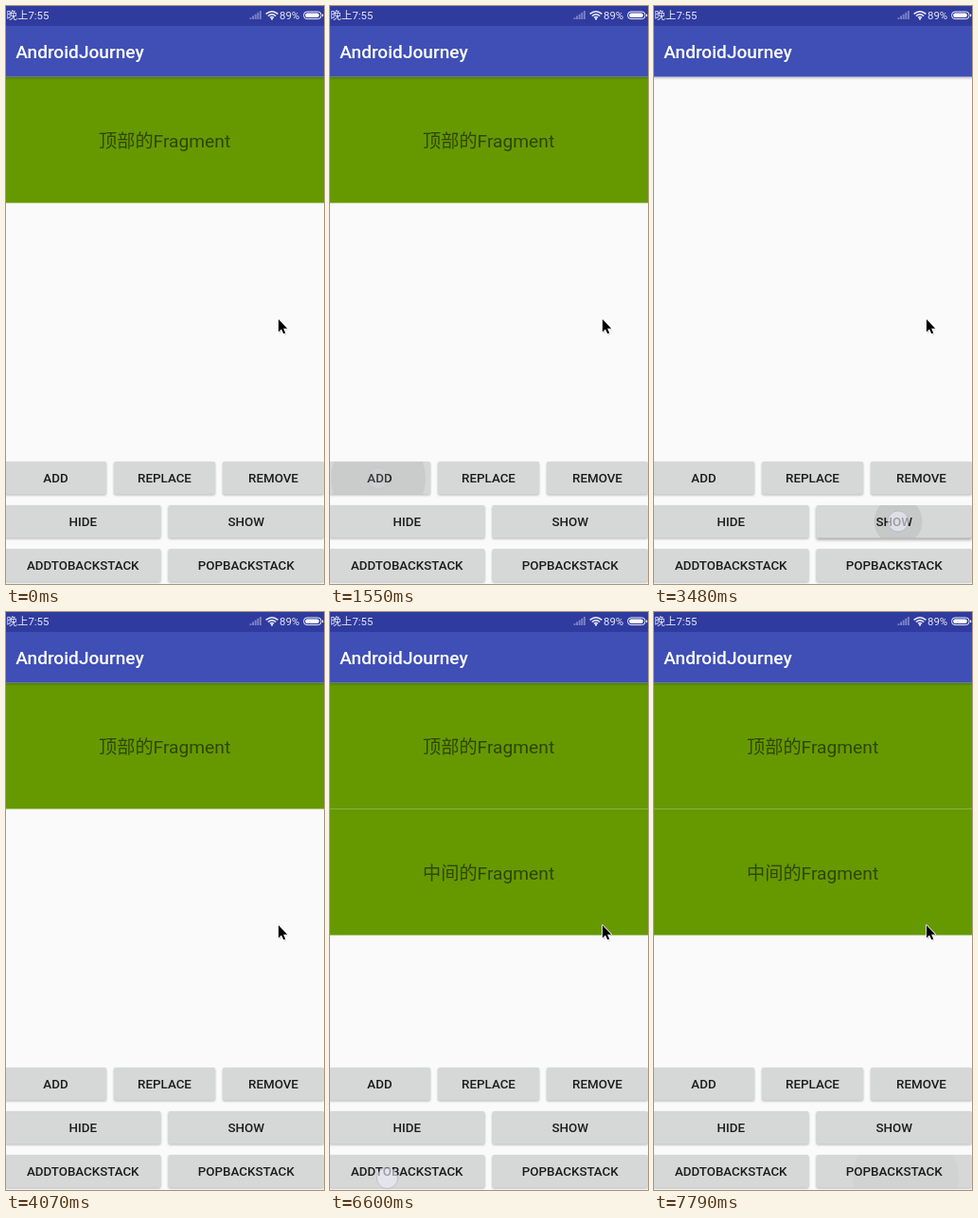
Animation, 336 px wide and 609 px high, one loop 8000 ms. Source, as an HTML page:

```html
<!DOCTYPE html>
<html lang="zh-CN">
<head>
<meta charset="utf-8">
<title>Fragment demo</title>
<style>
  html, body { margin: 0; width: 100%; height: 100%; overflow: hidden; background: #fafafa; }
  svg { display: block; width: 100vw; height: 100vh; }
  text { font-family: Roboto, "Noto Sans CJK SC", "Noto Sans CJK", sans-serif; }
  .status { font-size: 11.4px; fill: #fff; fill-opacity: .88; }
  .title { font-size: 19.1px; font-weight: 500; fill: #fff; }
  .label { font-size: 13.37px; font-weight: 500; fill: #000; fill-opacity: .87; text-anchor: middle; }
  .pane { font-size: 19.2px; fill: #000; fill-opacity: .54; text-anchor: middle; }
  .flat { filter: drop-shadow(0 1px 1px rgba(0, 0, 0, .27)); }
  .lifted { filter: drop-shadow(0 2.2px 1.8px rgba(0, 0, 0, .34)); }
</style>
</head>
<body>
<svg id="stage" viewBox="0 0 336 609">
  <defs>
    <linearGradient id="fall" x2="0" y2="1">
      <stop offset="0" stop-color="#000" stop-opacity=".26"/>
      <stop offset=".4" stop-color="#000" stop-opacity=".1"/>
      <stop offset="1" stop-color="#000" stop-opacity="0"/>
    </linearGradient>
  </defs>
  <rect width="336" height="609" fill="#fafafa"/>
  <g id="panes"></g>
  <rect y="74.5" width="336" height="4" fill="url(#fall)"/>
  <rect y="20" width="336" height="54.5" fill="#3f4fb6"/>
  <rect width="336" height="21" fill="#303b9f"/>
  <text class="title" x="10.3" y="55.2">AndroidJourney</text>

  <text class="status" x=".6" y="14">晚上7:55</text>
  <g id="signal" fill="#fff" fill-opacity=".36"></g>
  <g fill="none" stroke="#fff" stroke-opacity=".92" stroke-width="1.4">
    <path d="M274.6 8.4Q281 3 287.4 8.4M276.8 10.5Q281 7 285.2 10.5M278.9 12.3Q281 10.6 283.1 12.3"/>
    <rect x="314.6" y="6" width="18.4" height="7.6" rx="3.4" stroke-width="1"/>
  </g>
  <circle cx="281" cy="13.6" r="1.1" fill="#fff"/>
  <text class="status" x="289" y="14">89%</text>
  <rect x="316.2" y="7.5" width="14.6" height="4.6" rx="2" fill="#fff"/>
  <rect x="334" y="8.4" width="1.2" height="2.8" rx=".6" fill="#fff"/>

  <g id="buttons"></g>
  <circle id="dot" r="11" fill="#ecedf8" fill-opacity=".62" stroke="#8d8da4" stroke-opacity=".4" stroke-width=".9"/>
  <g stroke-linejoin="round">
    <path d="M289 331.5v13.4l3.1-2.8 2.2 4.7 2-.9-2.1-4.7h4.1z" fill="#000" opacity=".2"/>
    <path d="M287.9 330v13.4l3.1-2.8 2.2 4.7 2-.9-2.1-4.7h4.1z" fill="#000" stroke="#fff" stroke-width="1.6" paint-order="stroke"/>
  </g>
</svg>
<script>
const LOOP = 8000;
const NS = 'http://www.w3.org/2000/svg';
const byId = id => document.getElementById(id);

function add(parent, tag, attrs, text) {
  const el = document.createElementNS(NS, tag);
  for (const key in attrs) el.setAttribute(key, attrs[key]);
  if (text) el.textContent = text;
  return parent.appendChild(el);
}

for (let i = 0; i < 5; i++) {
  const h = 1.8 + i * 1.8;
  add(byId('signal'), 'rect', { x: 257.5 + i * 2.6, y: 14 - h, width: 1.9, height: h });
}

// Each pane is visible during its [start, end) spans.
const panes = [
  ['顶部的Fragment', [[0, 650], [1550, 2590], [3630, LOOP]]],
  ['中间的Fragment', [[5570, LOOP]]],
  ['底部的Fragment', [[6750, 7640]]]
].map(([label, spans], i) => {
  const el = add(byId('panes'), 'g', { transform: `translate(0 ${74.5 + i * 133})` });
  add(el, 'rect', { width: 336, height: 133, fill: '#690' });
  add(el, 'text', { class: 'pane', x: 167.6, y: 74.3 }, label);
  return { el, spans };
});

function makeButton(label, x, y, width) {
  const g = add(byId('buttons'), 'g', {});
  const box = { x, y, width, height: 34.6, rx: 1.9 };
  const id = 'clip' + label;
  const face = add(g, 'rect', { ...box, fill: '#d6d7d7' });
  add(add(g, 'clipPath', { id }), 'rect', box);
  const ripple = add(add(g, 'g', { 'clip-path': `url(#${id})` }), 'circle', {});
  add(g, 'text', { class: 'label', x: x + width / 2, y: y + 22 }, label);
  return { face, ripple };
}

const buttons = {};
[
  ['ADD', 'REPLACE', 'REMOVE'],
  ['HIDE', 'SHOW'],
  ['ADDTOBACKSTACK', 'POPBACKSTACK']
].forEach((row, r) => {
  const width = (337 - 8 * (row.length - 1)) / row.length;
  row.forEach((label, c) => {
    buttons[label] = makeButton(label, -1 + c * (width + 8), 480 + r * 46, width);
  });
});

// Touch phases: dot opacity, ripple radius, ripple opacity, raised button.
const touch = { dot: 1, r: 0, ink: 0, lift: false };
const press = { dot: 1, r: 25.5, ink: .07, lift: true };
const spread = { dot: 1, r: 60, ink: .07, lift: true };
const soft = { ...press, lift: false };
const leave = { dot: .25, r: 50, ink: .055, lift: false };
const fade = { dot: 0, r: 56, ink: .025, lift: false };

// Taps: label, x, y, end, then [start, phase] in order.
const taps = [
  ['REMOVE', 291.5, 494, 1100, [500, touch], [650, press], [800, fade]],
  ['ADD', 51, 497.5, 1700, [1400, press], [1550, leave]],
  ['HIDE', 67.5, 544, 2740, [2440, touch], [2590, press]],
  ['SHOW', 258, 543, 3780, [3480, press], [3630, spread]],
  ['REPLACE', 180, 497, 5720, [5420, press], [5570, leave]],
  ['ADDTOBACKSTACK', 60.5, 596.5, 7190, [6600, touch], [6750, soft], [6900, fade]],
  ['POPBACKSTACK', 266, 596, LOOP, [7640, spread], [7790, fade]]
];

const dot = byId('dot');

function draw(t) {
  for (const { el, spans } of panes) {
    const shown = spans.some(([from, to]) => t >= from && t < to);
    el.setAttribute('visibility', shown ? 'visible' : 'hidden');
  }
  dot.setAttribute('opacity', 0);
  for (const [label, x, y, end, ...steps] of taps) {
    const step = t < end && steps.filter(s => t >= s[0]).pop();
    const phase = step ? step[1] : { dot: 0, r: 0, ink: 0, lift: false };
    const { face, ripple } = buttons[label];
    face.setAttribute('class', phase.lift ? 'lifted' : 'flat');
    ripple.setAttribute('cx', x);
    ripple.setAttribute('cy', y);
    ripple.setAttribute('r', phase.r);
    ripple.setAttribute('fill-opacity', phase.ink);
    if (step) {
      dot.setAttribute('cx', x);
      dot.setAttribute('cy', y);
      dot.setAttribute('opacity', phase.dot);
    }
  }
}

const start = performance.now();
function tick() {
  draw((performance.now() - start) % LOOP);
  requestAnimationFrame(tick);
}
draw(0);
requestAnimationFrame(tick);
</script>
</body>
</html>
```
